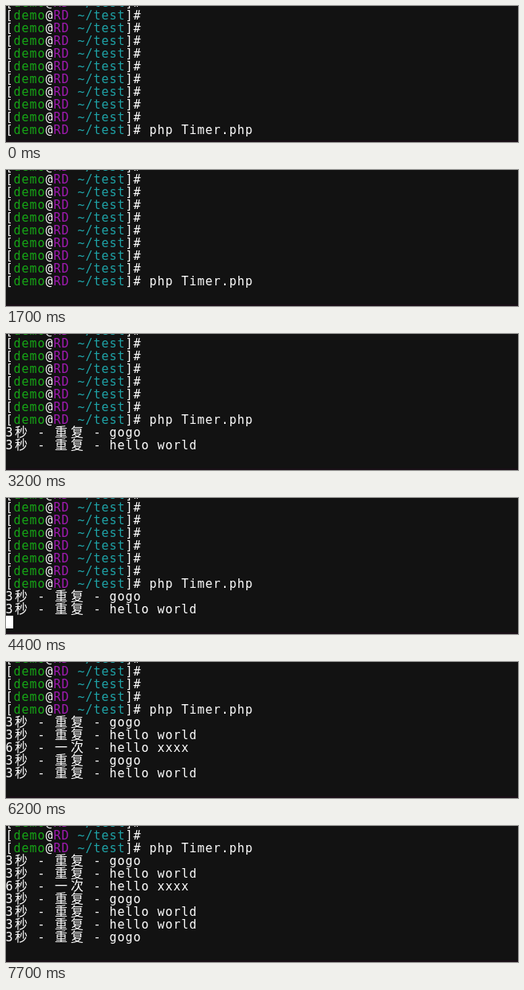
These frames come from a looping animation (641x171 px, 8 s). An HTML page with a canvas:

```html
<!DOCTYPE html>
<html lang="zh">
<head>
<meta charset="utf-8">
<style>
  html, body { margin: 0; width: 100%; height: 100%; overflow: hidden; background: #121212; }
  canvas { display: block; }
</style>
</head>
<body>
<canvas id="screen" width="641" height="171"></canvas>
<script>
const ctx = document.getElementById('screen').getContext('2d');
const LOOP = 8000, CELL = 10, ROW = 16, CURSOR_TOP = 148;
const WHITE = '#fff', GREEN = '#16a616', PURPLE = '#a01ab0', TEAL = '#1fa3a7';

const PROMPT = [['[', WHITE], ['demo', GREEN], ['@', WHITE], ['RD', PURPLE], [' ~/test', TEAL], [']# ', WHITE]];
const COMMAND = [...PROMPT, ['php Timer.php', WHITE]];
const repeat = word => [['3秒 - 重复 - ' + word, WHITE]];
const once = word => [['6秒 - 一次 - ' + word, WHITE]];

// Lines printed by the running script, each with its time in ms
const OUTPUT = [
  [2300, repeat('gogo')], [2300, repeat('hello world')],
  [4500, once('hello xxxx')], [4500, repeat('gogo')], [4500, repeat('hello world')],
  [6600, repeat('hello world')], [6600, repeat('gogo')]
];
const ENTER = 300;
// The cursor flips between hidden and shown at these times
const BLINKS = [100, 900, 1300, 1700, 2100, 2400, 2800, 3200, 3600, 4000, 4400,
  4700, 5000, 5400, 5800, 6200, 6600, 7000, 7300, 7700];

function drawLine(parts, top) {
  let x = -1;
  for (const [text, color] of parts) {
    ctx.fillStyle = color;
    for (const char of text) {
      const wide = char > '\u2fff';
      const width = wide ? 2 * CELL : CELL;
      ctx.font = wide ? '16px "Noto Sans CJK SC", "Noto Sans CJK", sans-serif'
                      : '15px "DejaVu Sans Mono", monospace';
      ctx.fillText(char, x + width / 2, top + 13);
      x += width;
    }
  }
}

function draw(t) {
  ctx.fillStyle = '#121212';
  ctx.fillRect(0, 0, 641, 171);
  ctx.fillStyle = '#190f17';
  ctx.fillRect(0, 169, 641, 2);
  ctx.textAlign = 'center';

  const entered = t >= ENTER;
  const lines = [...Array(11).fill(PROMPT), COMMAND,
    ...OUTPUT.filter(([time]) => t >= time).map(([, line]) => line)];
  const bottom = entered ? CURSOR_TOP - ROW : CURSOR_TOP;
  lines.reverse().forEach((line, i) => drawLine(line, bottom - i * ROW));

  if (BLINKS.filter(time => t >= time).length % 2) {
    ctx.fillStyle = WHITE;
    ctx.fillRect(entered ? 0 : 31 * CELL, CURSOR_TOP, 9, ROW);
  }
}

const start = performance.now();
function tick() {
  draw((performance.now() - start) % LOOP);
  requestAnimationFrame(tick);
}
tick();
</script>
</body>
</html>
```
